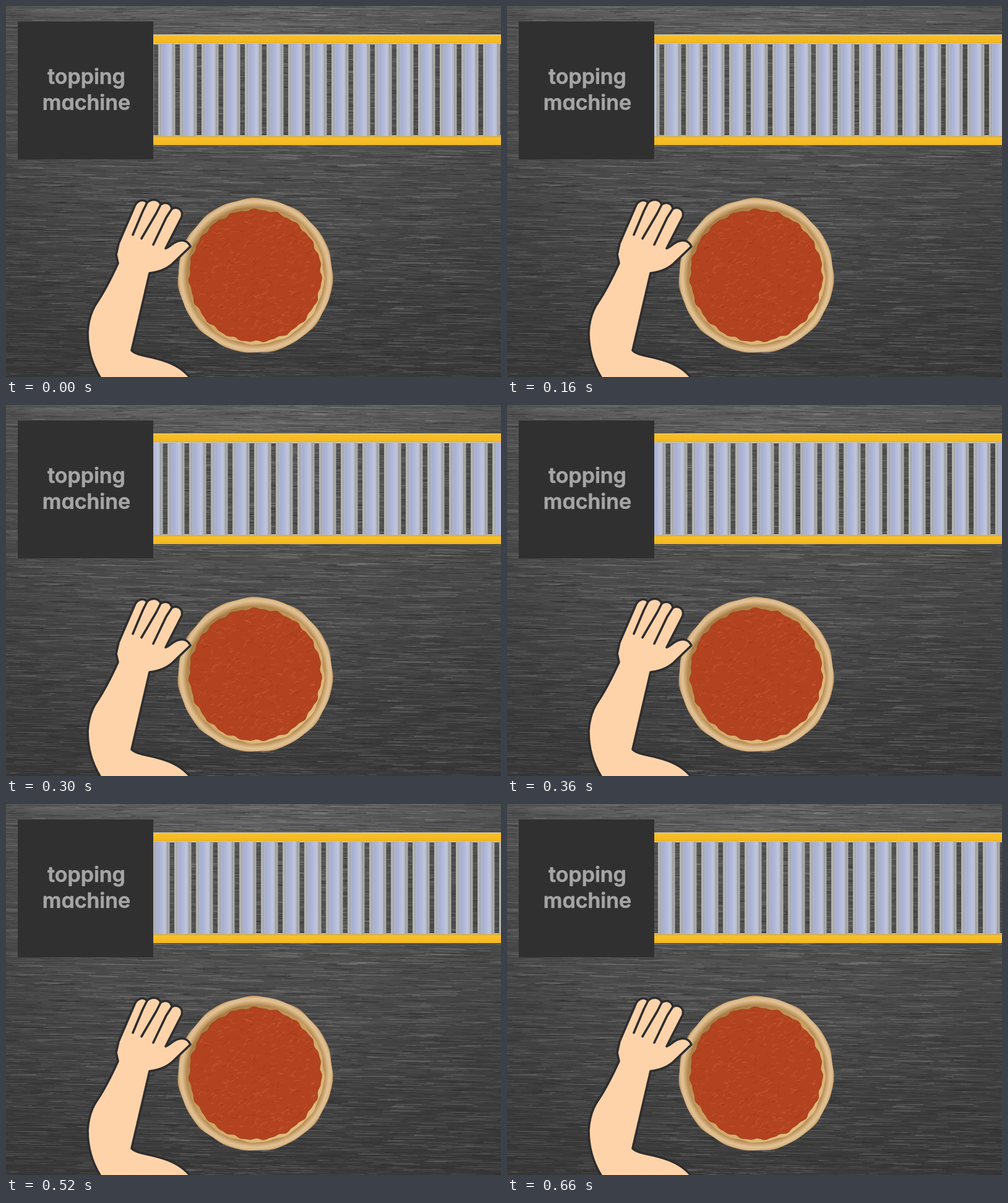
Animation of 800 by 600 pixels, one loop 0.68 s. Source, as an HTML page with a canvas:

```html
<!DOCTYPE html>
<html lang="en">
<head>
<meta charset="utf-8">
<title>Topping machine</title>
<style>
  html, body { margin: 0; width: 800px; height: 600px; overflow: hidden; background: #444; }
  body { position: relative; }
  canvas, svg, div { position: absolute; left: 0; top: 0; }
  #rollers, #rails { left: 238px; width: 562px; }
  #rollers {
    top: 60px;
    height: 151px;
    background:
      linear-gradient(90deg, #aaaba6 0, #b9bab5 2px, #a3a5a5 4px, #b0b6d0 6px, #a7afd0 8px,
        #b2b9d8 14px, #bfc5dd 19px, #b9bcc8 22px, #969798 24px, #b4b5b1 26px, #a5a6a2 27px, #0000 28px)
        0 1px / 35px 149px repeat-x,
      linear-gradient(#c4c4c0 0 2px, #0000 2px 149px, #c4c4c0 149px);
  }
  #rails {
    top: 46px;
    height: 179px;
    background: linear-gradient(#e2d3a8 0 1px, #f8c02a 1px, #f5b91f 12px, #e5ae25 14px, #0000 14px 164px,
      #cda53c 165px, #f8c02a 167px, #f5b91f 178px, #d9aa3c 179px);
  }
  text {
    font: 600 34px Inter, "Open Sans", sans-serif;
    font-feature-settings: "cv11";
    fill: #a5a5a5;
    stroke: #a5a5a5;
    stroke-width: .7px;
    stroke-linejoin: round;
    text-anchor: middle;
  }
</style>
</head>
<body>
<canvas id="table" width="800" height="600"></canvas>
<div id="rollers"></div>
<div id="rails"></div>
<svg width="800" height="600">
  <rect x="19" y="25" width="219" height="223" fill="#303030"/>
  <text x="130" y="126">topping</text>
  <text x="130" y="168">machine</text>
  <g stroke="#2d2d2f" stroke-width="3.6" stroke-linejoin="round" stroke-linecap="round" fill="none">
    <path fill="#ffd3a9" d="M153 602C138 578 132 553 132 528C133 508 138 492 148 478C160 460 171 438 181 416L178 402L182 384
      L207 326C211 314 222 311 228 318C235 311 247 312 250 321C258 316 267 319 268 328C276 323 287 329 284 341
      L262 384L258 392C266 389 270 382 279 380C288 377 295 382 298 389L273 413C263 424 250 430 232 432
      L203 557C211 565 228 566 246 571C269 577 288 588 299 603"/>
    <path d="M228 318L221 332L205 370M250 321L243 335L219 376M268 328L259 342L238 386"/>
  </g>
</svg>
<script>
const ctx = document.getElementById('table').getContext('2d');
const rollers = document.getElementById('rollers');
const STEP_MS = 20, STEPS = 34, FIRST_ROLLER = 8;
const TAU = Math.PI * 2;

let seed = 7;
const random = () => (seed = seed * 16807 % 2147483647) / 2147483647;
const between = (low, high) => low + random() * (high - low);

function gradient(fill, stops) {
  stops.forEach(([at, color]) => fill.addColorStop(at, color));
  return fill;
}

function drawWood() {
  ctx.fillStyle = gradient(ctx.createLinearGradient(0, 0, 0, 600),
    [[0, '#636363'], [0.1, '#575757'], [0.4, '#4f4f4f'], [0.7, '#454545'], [1, '#3e3e3e']]);
  ctx.fillRect(0, 0, 800, 600);
  for (let i = 0; i < 11000; i++) {
    const x = between(-60, 800), y = between(0, 600), length = between(5, 70);
    const light = random() < 0.5;
    ctx.strokeStyle = light ? `rgba(170,170,170,${between(0.04, 0.36)})` : `rgba(32,32,32,${between(0.05, 0.38)})`;
    ctx.lineWidth = between(0.4, 1.2);
    ctx.beginPath();
    ctx.moveTo(x, y);
    ctx.lineTo(x + length, y + length * between(-0.01, 0.04));
    ctx.stroke();
  }
  ctx.fillStyle = gradient(ctx.createRadialGradient(400, 220, 200, 400, 220, 560),
    [[0, 'rgba(40,40,40,0)'], [1, 'rgba(40,40,40,.35)']]);
  ctx.fillRect(0, 0, 800, 600);
}

// A closed outline around the pizza centre, rippled by two sine waves.
function disc(radius, ripple, waves) {
  ctx.beginPath();
  for (let a = 0; a < TAU; a += 0.02) {
    const r = radius + ripple * (Math.sin(a * waves) + 0.6 * Math.sin(a * (waves * 2 - 3) + 1));
    ctx.lineTo(403 + r * Math.cos(a), 436 + r * Math.sin(a));
  }
  ctx.closePath();
}

function drawPizza() {
  disc(125, 0.7, 11);
  ctx.fillStyle = gradient(ctx.createRadialGradient(403, 436, 106, 403, 436, 126),
    [[0, '#cda063'], [0.25, '#b38a55'], [0.42, '#c9a16b'], [0.65, '#e0c195'], [0.85, '#dcb988'], [1, '#b58a57']]);
  ctx.fill();

  // Dark inner wall at the upper left, lit one at the lower right.
  disc(111, 0.8, 13);
  ctx.fillStyle = gradient(ctx.createLinearGradient(330, 350, 480, 520),
    [[0, '#a57a45'], [0.5, '#cfa161'], [1, '#e3bf81']]);
  ctx.fill();

  disc(106, 1.2, 19);
  ctx.fillStyle = '#b34320';
  ctx.fill();
  ctx.strokeStyle = '#a94420';
  ctx.lineWidth = 1.5;
  ctx.stroke();

  ctx.save();
  ctx.clip();
  for (let i = 0; i < 420; i++) {
    const a = between(0, TAU), r = 102 * Math.sqrt(random());
    const x = 403 + r * Math.cos(a), y = 436 + r * Math.sin(a);
    const dx = between(3, 9), dy = between(-6, 2);
    ctx.strokeStyle = i % 3 ? 'rgba(205,104,62,.42)' : 'rgba(145,46,18,.35)';
    ctx.lineWidth = between(0.7, 1.6);
    ctx.beginPath();
    ctx.moveTo(x, y);
    ctx.quadraticCurveTo(x + dx / 2, y + dy - 2, x + dx, y + dy);
    ctx.stroke();
  }
  ctx.restore();
}

function animate() {
  const step = Math.floor(performance.now() / STEP_MS) % STEPS;
  rollers.style.backgroundPositionX = `${FIRST_ROLLER + step}px, 0`;
  requestAnimationFrame(animate);
}

drawWood();
drawPizza();
animate();
</script>
</body>
</html>
```
